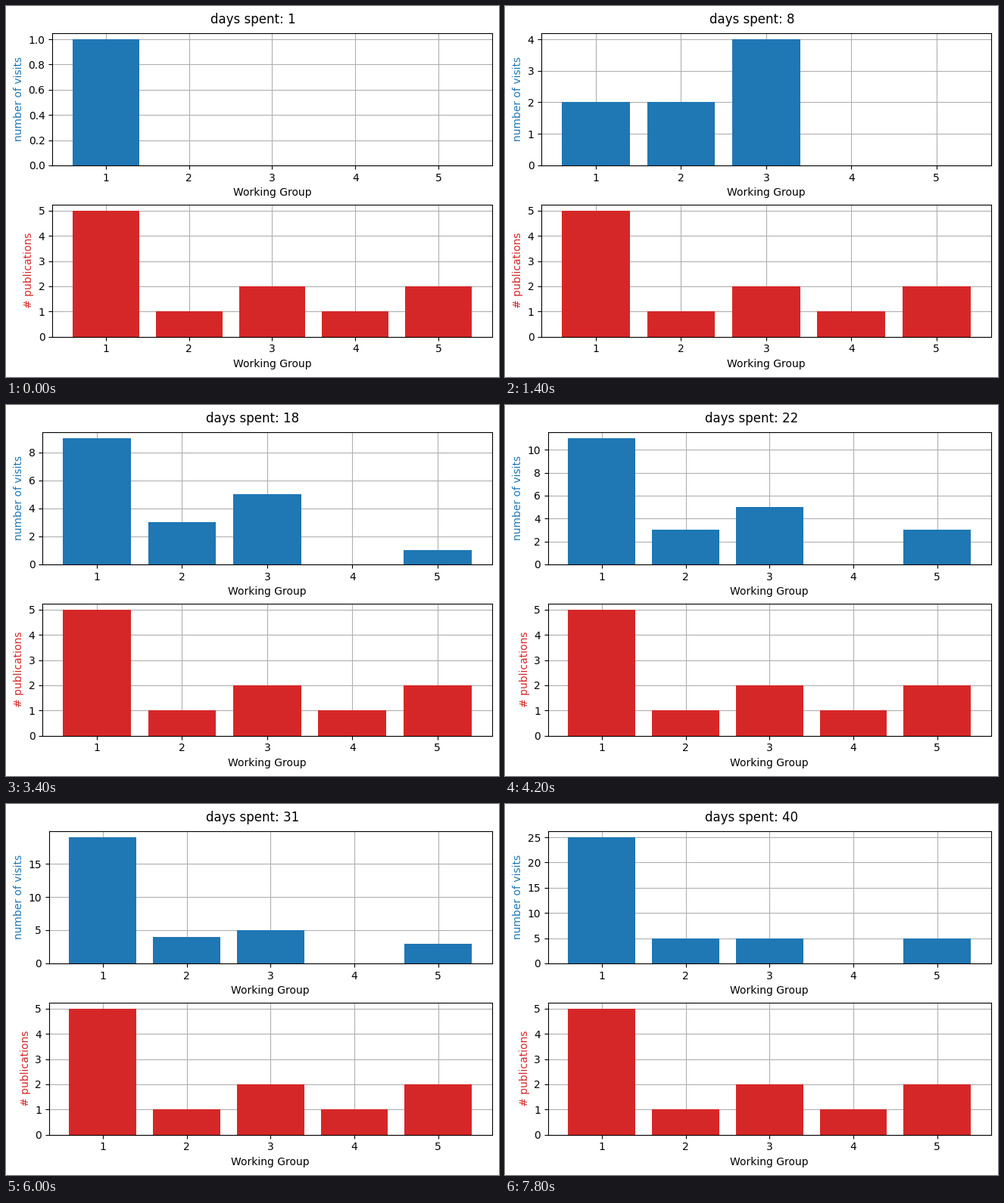
A matplotlib script for the animation above (8 s loop, 651x491 px).

```python
import numpy as np
import matplotlib.pyplot as plt
from matplotlib.animation import FuncAnimation
from matplotlib.transforms import Affine2D

W, H, DPI = 651, 491, 100
AREA_W, AREA_H = 640, 480  # layout area inside the stage
SHIFT = 5.83               # its offset from the lower left corner

GROUPS = np.arange(1, 6)
PUBLICATIONS = [5, 1, 2, 1, 2]
# (group, days in a row)
STAYS = [(1, 2), (2, 2), (3, 5), (2, 1), (1, 7), (5, 3), (1, 4), (2, 1),
         (1, 7), (5, 2), (1, 2), (2, 1), (1, 3)]
VISITS = np.repeat([g for g, _ in STAYS], [n for _, n in STAYS])

plt.rcParams["font.family"] = "DejaVu Sans"
fig, (top, bottom) = plt.subplots(2, figsize=(W / 100, H / 100), dpi=DPI,
                                  layout="constrained")
fig.get_layout_engine().set(
    rect=(SHIFT / W, SHIFT / H, AREA_W / W, AREA_H / H))

# The layout places the title against the stage; move it into the area.
title = fig.suptitle("")
title.set_transform(title.get_transform() + Affine2D().translate(
    SHIFT + (AREA_W - W) / 2, SHIFT + AREA_H - H))


def bar_chart(ax, heights, label, color):
    ax.clear()
    ax.bar(GROUPS, heights, color=color)
    ax.set_axisbelow(True)
    ax.grid(True)
    ax.set_xlabel("Working Group")
    ax.set_ylabel(label, color=color)


def update(i):
    day = i + 1
    counts = np.bincount(VISITS[:day], minlength=6)[1:]
    bar_chart(top, counts, "number of visits", "tab:blue")
    bar_chart(bottom, PUBLICATIONS, "# publications", "tab:red")
    title.set_text(f"days spent: {day}")
    return []


anim = FuncAnimation(fig, update, frames=len(VISITS), interval=200,
                     init_func=lambda: update(0), repeat=True, repeat_delay=0)
plt.show()
```
